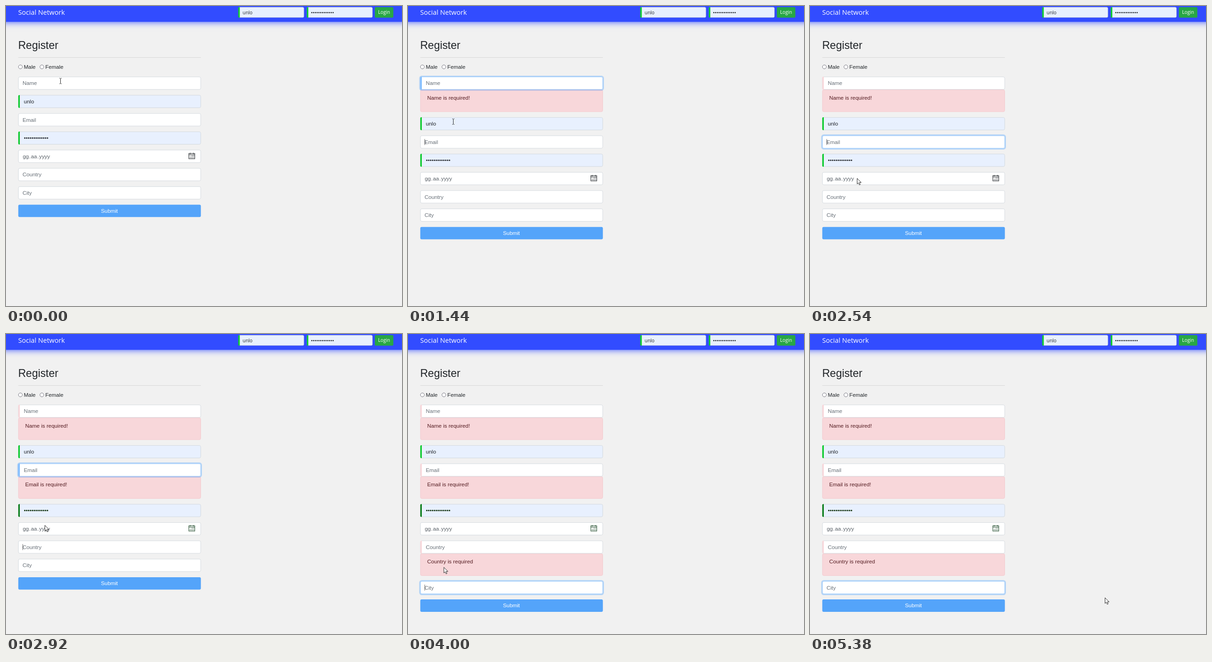
Write an HTML page with a canvas that moves like this. It is 861 px wide and 650 px high and loops after 5690 ms.

```html
<!DOCTYPE html>
<html lang="en">
<head>
<meta charset="utf-8">
<title>Register form validation</title>
<style>
  html, body { margin: 0; width: 100%; height: 100%; overflow: hidden; background: #f1f1f1; }
  canvas { display: block; width: 861px; height: 650px; }
</style>
</head>
<body>
<canvas id="stage" width="861" height="650"></canvas>
<script>
const ctx = document.getElementById('stage').getContext('2d');
const LOOP = 5690, TICK = 77.1, PHASE = 52.8, FADE = 150;
const SCALE = 11 / 15; // the page is shown zoomed out
const px = size => `${size * SCALE}px `;
const SANS = '"Liberation Sans", Arial, sans-serif';
const OPEN = '"Open Sans", sans-serif';
const BODY = px(16.08) + SANS, SMALL = px(14) + OPEN;
const USER = 'unlo';
const INK = '#212529', MUTED = '#687078', GREEN = '#0ccb2e', AUTOFILL = '#e8f0fe';
const BORDER = [206, 212, 218], FOCUS = [128, 189, 255], PINK = [248, 215, 218];
const LEFT = 26.7, WIDTH = 397, TOP = 153.3;
const FIELD_H = 38 * SCALE, PITCH = 54 * SCALE, ALERT_H = 48.2;

// Moments at which a field is clicked.
const NAME = 515, EMAIL = 1440, COUNTRY = 2905, CITY = 3830;

const fields = [
  { label: 'Name', focus: NAME, blur: EMAIL, error: 'Name is required!' },
  { value: USER },
  { label: 'Email', focus: EMAIL, blur: COUNTRY, error: 'Email is required!' },
  { secret: true },
  { date: true },
  { label: 'Country', focus: COUNTRY, blur: CITY, error: 'Country is required' },
  { label: 'City', focus: CITY, blur: Infinity }
];

// The pointer travels to each spot in turn; bow bends the path sideways.
const moves = [
  { from: 130, to: 361, x: 106, y: 165 },
  { from: 750, to: 1285, x: 98, y: 250, bow: 34 },
  { from: 1770, to: 2520, x: 102, y: 373, bow: 8 },
  { from: 2520, to: 2828, x: 84, y: 414 },
  { from: 2990, to: 3599, x: 77.5, y: 505 },
  { from: 4070, to: 4678, x: 209, y: 593, bow: 6 },
  { from: 4760, to: 5372, x: 641, y: 571, bow: -10 }
];

const clamp = v => Math.max(0, Math.min(1, v));
const mix = (a, b, p) => `rgb(${a.map((v, i) => Math.round(v + (b[i] - v) * p))})`;

function box(x, y, w, h, r, fill, border) {
  const inset = border ? SCALE / 2 : 0;
  ctx.beginPath();
  ctx.roundRect(x + inset, y + inset, w - 2 * inset, h - 2 * inset, r);
  ctx.fillStyle = fill;
  ctx.fill();
  if (border) {
    ctx.strokeStyle = border;
    ctx.lineWidth = SCALE + 0.1;
    ctx.stroke();
  }
}

function text(str, x, y, color, font = BODY, align = 'left') {
  ctx.font = font;
  ctx.textAlign = align;
  ctx.fillStyle = color;
  ctx.fillText(str, x, y);
}

function dots(x, y, step, r, color) {
  ctx.fillStyle = color;
  ctx.beginPath();
  for (let i = 0; i < 13; i++) {
    const cx = x + step * (i + 0.5);
    ctx.moveTo(cx + r, y);
    ctx.arc(cx, y, r, 0, 7);
  }
  ctx.fill();
}

const leftBar = (x, y, h, color) => box(x, y, 3.3, h, [2, 0, 0, 2], color);

function header() {
  ctx.save();
  ctx.shadowColor = '#324cff';
  ctx.shadowBlur = 20 * SCALE;
  ctx.fillStyle = '#324cff';
  ctx.fillRect(-40, -40, 941, 74.3);
  ctx.restore();
  text('Social Network', 26.4, 19.4, '#fff', px(20) + OPEN);
  for (const x of [505, 654]) {
    box(x, 2.4, 143, 31 * SCALE, 2.5, AUTOFILL, '#ced4da');
    leftBar(x, 2.4, 31 * SCALE, GREEN);
  }
  text(USER, 514.6, 18, INK, SMALL);
  dots(663, 14.3, 3.86, 1.35, INK);
  box(802, 2.6, 40.2, 31 * SCALE, 2.5, '#28a745');
  text('Login', 822, 17.4, '#fff', SMALL, 'center');
}

function heading() {
  text('Register', 26.4, 93, INK, px(32) + SANS);
  ctx.fillStyle = '#d8d8d8';
  ctx.fillRect(LEFT, 111, WIDTH, 1);
  for (const [x, label] of [[31.3, 'Male'], [78, 'Female']]) {
    ctx.beginPath();
    ctx.arc(x, 131.9, 4.2, 0, 7);
    ctx.fillStyle = '#fff';
    ctx.fill();
    ctx.strokeStyle = '#767680';
    ctx.lineWidth = 1;
    ctx.stroke();
    text(label, x + 7.5, 135.6, INK);
  }
}

function calendar(x, y, color) {
  ctx.strokeStyle = ctx.fillStyle = color;
  ctx.lineWidth = 1;
  ctx.strokeRect(x + 0.5, y + 1.5, 13, 11.5);
  ctx.fillRect(x, y + 4, 14, 1);
  for (const ring of [3, 10]) ctx.fillRect(x + ring, y, 1, 3);
  for (let i = 2; i < 15; i++)
    ctx.fillRect(x + 2.5 + (i % 5) * 2.1, y + 6.2 + Math.floor(i / 5) * 2.2, 1, 1.1);
}

function dateHint(x, y) {
  for (const part of ['gg', '.', 'aa', '.', 'yyyy']) {
    text(part, x, y, '#596067');
    x += ctx.measureText(part).width + SCALE;
  }
}

function layout(t) {
  let y = TOP;
  const rows = fields.map(field => {
    const row = { field, y, failed: Boolean(field.error) && t >= field.blur };
    y += PITCH + (row.failed ? ALERT_H : 0);
    return row;
  });
  return { rows, submitY: y };
}

function focusRing(y, glow) {
  const spread = 3.2 * SCALE * glow;
  ctx.beginPath();
  ctx.roundRect(LEFT - spread, y - spread, WIDTH + 2 * spread, FIELD_H + 2 * spread, 3 + spread);
  ctx.roundRect(LEFT, y, WIDTH, FIELD_H, 3);
  ctx.fillStyle = `rgba(0,123,255,${0.25 * glow})`;
  ctx.fill('evenodd');
}

function drawField({ field, y, failed }, t) {
  const base = y + 18;
  const filled = field.value || field.secret;
  const glow = field.focus
    ? clamp((t - field.focus) / FADE) ** 2 * (1 - clamp((t - field.blur) / FADE)) : 0;
  const late = t >= COUNTRY;

  if (failed) {
    box(LEFT, y + FIELD_H, WIDTH, ALERT_H, 3, '#f8d7da', '#f5c6cb');
    text(field.error, 41.7, y + FIELD_H + 21.8, '#541c21');
  }
  if (glow) focusRing(y, glow);
  box(LEFT, y, WIDTH, FIELD_H, 3, filled ? AUTOFILL : '#fff', mix(BORDER, FOCUS, glow));

  if (filled) leftBar(LEFT, y, FIELD_H, field.secret && late ? '#0a7d1a' : GREEN);
  if (failed) leftBar(LEFT, y, FIELD_H, mix(PINK, FOCUS, glow));

  if (field.value) text(field.value, 38.7, base, INK);
  if (field.secret) dots(38.9, y + FIELD_H / 2, 4.1, 1.6, late ? '#143410' : INK);
  if (field.label) text(field.label, failed ? 38.7 : 35.9, base, MUTED);
  if (field.date) {
    dateHint(36.4, base);
    calendar(397, Math.round(y + 6), late ? '#1f4a2a' : INK);
  }
  const focused = t >= field.focus && t < field.blur;
  if (focused && (t - field.focus) % 1000 < 500) {
    ctx.fillStyle = '#333';
    ctx.fillRect(36, y + 7.5, SCALE, 13);
  }
}

function pointerAt(t) {
  let x = 118, y = 162;
  for (const move of moves) {
    const p = clamp((t - move.from) / (move.to - move.from));
    const dx = move.x - x, dy = move.y - y;
    const side = (move.bow || 0) * Math.sin(Math.PI * p) / Math.hypot(dx, dy);
    x += dx * p + dy * side;
    y += dy * p - dx * side;
    if (p < 1) break;
  }
  return [x, y];
}

const arrow = new Path2D('M0 0V12.2L2.8 9.7 4.8 14.2 6.8 13.3 4.9 8.9H8.8Z');

function drawPointer(x, y, overText) {
  ctx.save();
  if (overText) {
    ctx.translate(Math.round(x), Math.round(y));
    ctx.fillStyle = '#222';
    ctx.fillRect(0, -5, 1, 11);
    for (const edge of [-6, 6]) {
      ctx.fillRect(-2, edge, 2, 0.8);
      ctx.fillRect(1, edge, 2, 0.8);
    }
  } else {
    ctx.translate(x + 0.5, y + 0.5);
    ctx.fillStyle = '#fff';
    ctx.fill(arrow);
    ctx.strokeStyle = '#111';
    ctx.lineWidth = 0.9;
    ctx.stroke(arrow);
  }
  ctx.restore();
}

function render(time) {
  const t = PHASE + Math.floor((time - PHASE) / TICK) * TICK;
  const { rows, submitY } = layout(t);
  ctx.fillStyle = '#f1f1f1';
  ctx.fillRect(0, 0, 861, 650);
  header();
  heading();
  rows.forEach(row => drawField(row, t));
  box(LEFT, submitY, WIDTH, 26.8, 3, '#54a4fa');
  text('Submit', 224.8, submitY + 17, '#fff', BODY, 'center');

  const [x, y] = pointerAt(t);
  const overText = rows.some(row => !row.field.date && x > LEFT && x < LEFT + WIDTH
    && y >= row.y && y <= row.y + FIELD_H);
  drawPointer(x, y, overText);
}

const start = performance.now();
function loop() {
  render((performance.now() - start) % LOOP);
  requestAnimationFrame(loop);
}
loop();
</script>
</body>
</html>
```
